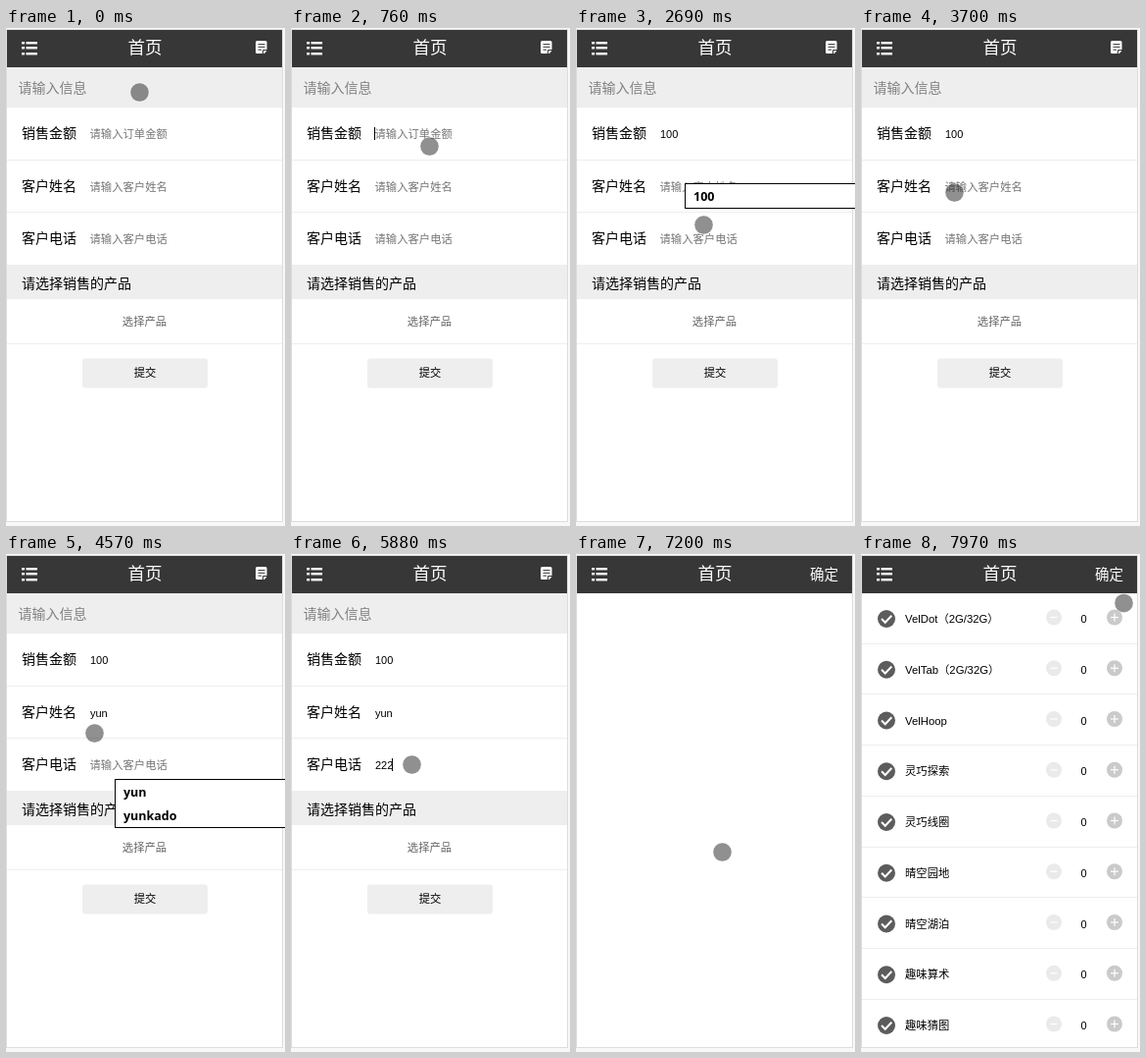
Animation of 285 by 507 pixels, one loop 8 s. Source, as an HTML page with a canvas:

```html
<!DOCTYPE html>
<html lang="zh-CN">
<head>
<meta charset="utf-8">
<title>首页</title>
<style>
html, body { margin: 0; width: 100%; height: 100%; overflow: hidden; background: #f8f8f8; }
canvas { display: block; }
</style>
</head>
<body>
<canvas id="stage" width="285" height="507"></canvas>
<script>
const ctx = document.getElementById('stage').getContext('2d');
const LOOP = 8000;
const W = 285, H = 507;
const SANS = '"Liberation Sans", "Noto Sans CJK SC", "Noto Sans CJK", sans-serif';
const CJK = '"Noto Sans CJK SC", "Noto Sans CJK", sans-serif';
const BOLD = '"Open Sans", "Noto Sans", sans-serif';

const FIELDS = [
  { y: 108, label: '销售金额', hint: '请输入订单金额' },
  { y: 162, label: '客户姓名', hint: '请输入客户姓名' },
  { y: 215, label: '客户电话', hint: '请输入客户电话' }
];
// typed text: [time, value] per field
const TYPED = [
  [[1220, '1'], [1530, '10'], [1680, '100']],
  [[3890, 'y'], [3950, 'yu'], [4020, 'yun']],
  [[5600, '2'], [5660, '22'], [5730, '222']]
];
// caret: [from, to, field]
const CARET = [
  [760, 2310, 0], [2840, 3090, 0],
  [3160, 3700, 1], [3890, 4570, 1], [5030, 5180, 1],
  [5180, 6250, 2], [6880, 7200, 2]
];
// suggestions: [from, to, top, items]
const LISTS = [
  [1220, 1610, 158, ['1', '100', '10', '12', '15', '18']],
  [1610, 1760, 158, ['100', '10']],
  [1760, 3090, 158, ['100']],
  [3890, 5180, 229, ['yun', 'yunkado']],
  [5600, 5880, 277, ['222', '2220']]
];
// pointer: [first step, last step, steps, x, y, control x, control y]
const MOVES = [
  [70, 190, 3, 169.5, 14.5],
  [260, 440, 4, 141.5, 120.5, 166, 75],
  [2310, 2310, 1, 141.5, 121.5],
  [2460, 2540, 2, 132.5, 212.5],
  [2690, 2690, 1, 130.5, 200.5],
  [2760, 2840, 2, 96.5, 168.5],
  [3090, 3090, 1, 100.5, 168.5],
  [3470, 3470, 1, 95.5, 167.5],
  [4570, 4570, 1, 90.5, 182.5],
  [4650, 5030, 6, 123.5, 209.5, 132, 202],
  [5420, 5420, 1, 123.5, 210.5],
  [5600, 5730, 3, 123.5, 214.5],
  [5960, 6330, 6, 124.5, 337.5, 89, 270],
  [6500, 6580, 2, 149.5, 303.5, 154, 306],
  [7510, 7740, 4, 221.5, 122.5],
  [7890, 7970, 2, 268.5, 50]
];
const PRODUCTS = [
  'VelDot（2G/32G）', 'VelTab（2G/32G）', 'VelHoop', '灵巧探索', '灵巧线圈',
  '晴空园地', '晴空湖泊', '趣味算术', '趣味猜图'
];

function rect(x, y, w, h, color) {
  ctx.fillStyle = color;
  ctx.fillRect(x, y, w, h);
}

function round(x, y, w, h, r, color) {
  ctx.fillStyle = color;
  ctx.beginPath();
  ctx.roundRect(x, y, w, h, r);
  ctx.fill();
}

function disc(x, y, r, color) {
  ctx.fillStyle = color;
  ctx.beginPath();
  ctx.arc(x, y, r, 0, Math.PI * 2);
  ctx.fill();
}

function line(points, color, width) {
  ctx.strokeStyle = color;
  ctx.lineWidth = width;
  ctx.beginPath();
  points.forEach(([x, y], i) => i ? ctx.lineTo(x, y) : ctx.moveTo(x, y));
  ctx.stroke();
}

// y is the middle of the glyphs
function text(str, x, y, size, color, { family = CJK, weight = 400, align = 'left' } = {}) {
  ctx.font = `${weight} ${size}px ${family}`;
  ctx.textAlign = align;
  ctx.fillStyle = color;
  ctx.fillText(str, x, Math.round(y + size * 0.37));
}

function pointerAt(t) {
  let x = 136.5, y = 65.5;
  for (const [t0, t1, n, x1, y1, cx = (x + x1) / 2, cy = (y + y1) / 2] of MOVES) {
    if (t < t0) break;
    const gap = n > 1 ? (t1 - t0) / (n - 1) : 1;
    const u = Math.min(n, Math.floor((t - t0) / gap + 0.001) + 1) / n;
    const a = (1 - u) * (1 - u), b = 2 * u * (1 - u), c = u * u;
    x = a * x + b * cx + c * x1;
    y = a * y + b * cy + c * y1;
    if (u < 1) break;
  }
  return [x, y];
}

function valueAt(field, t) {
  return TYPED[field].reduce((v, [at, s]) => t >= at ? s : v, '');
}

function drawHeader(picking) {
  rect(1, 2, 281, 38, '#373737');
  for (const y of [14, 19, 25]) {
    rect(16, y, 3, 2.4, '#fff');
    rect(20.5, y, 11.5, 2.4, '#fff');
  }
  text('首页', 142, 20, 17.5, '#fff', { align: 'center' });
  if (picking) {
    text('确定', 239, 20.5, 14.5, '#fff', { weight: 500 });
    return;
  }
  round(255, 13, 11.5, 13, 1.5, '#fff');
  rect(257.5, 16, 7, 1.1, '#444');
  rect(257.5, 18.8, 7, 1.1, '#444');
  rect(257.5, 21.6, 3.5, 1.1, '#444');
  line([[262.5, 26], [262.5, 22.5], [267, 22.5]], '#373737', 1);
  ctx.fillStyle = '#373737';
  ctx.beginPath();
  ctx.moveTo(267, 22.5);
  ctx.lineTo(267, 27);
  ctx.lineTo(263, 27);
  ctx.fill();
}

function drawForm(t) {
  rect(1, 40, 281, 41, '#eee');
  text('请输入信息', 12.5, 61, 14, '#808080');
  FIELDS.forEach(({ y, label, hint }, i) => {
    const value = valueAt(i, t);
    text(label, 16, y - 1.5, 14, '#000');
    if (value) text(value, 86, y, 11, '#000', { family: SANS });
    else text(hint, 85.5, y, 11.33, '#757575');
    if (CARET.some(([a, b, f]) => f === i && t >= a && t < b)) {
      ctx.font = `11px ${SANS}`;
      rect(Math.floor(85.6 + ctx.measureText(value).width), y - 7, 1, 13, '#000');
    }
  });
  rect(1, 134, 281, 1, '#eee');
  rect(1, 187, 281, 1, '#eee');
  rect(1, 241, 281, 35, '#eee');
  text('请选择销售的产品', 16, 260, 14, '#000');
  text('选择产品', 141.5, 299, 11.33, '#666', { align: 'center' });
  rect(1, 321, 281, 1, '#eee');
  round(78, 336.5, 128, 30, 3, '#eee');
  text('提交', 142, 351, 11.33, '#000', { align: 'center' });
}

function drawProducts() {
  PRODUCTS.forEach((name, i) => {
    const y = 66 + i * 51.75;
    disc(26, y, 9, '#5c5c5c');
    line([[21, y], [24.7, y + 3.7], [31.3, y - 3.2]], '#fff', 2);
    text(name, 45, y, 11.33, '#000', { family: SANS });
    disc(197, y - 1.5, 8, '#eaeaea');
    line([[193.5, y - 1.5], [200.5, y - 1.5]], '#fff', 1.2);
    text('0', 227.5, y, 11, '#000', { family: SANS, align: 'center' });
    disc(259, y - 1.5, 8, '#cacaca');
    line([[255, y - 1.5], [263, y - 1.5]], '#fff', 1.2);
    line([[259, y - 5.5], [259, y + 2.5]], '#fff', 1.2);
    if (i < PRODUCTS.length - 1) rect(1, Math.round(y + 24.5), 281, 1, '#eee');
  });
}

function drawList(t) {
  const open = LISTS.find(([a, b]) => t >= a && t < b);
  if (!open) return;
  const [, , top, items] = open;
  const h = items.length * 24 + 2;
  const left = W - 174;
  rect(left, top, 180, h, '#000');
  rect(left + 1, top + 1, 180, h - 2, '#fff');
  items.forEach((s, i) =>
    text(s, left + 9, top + 13.5 + i * 24, 12.5, '#000', { family: BOLD, weight: 700 }));
}

function drawPointer(t) {
  const [x, y] = pointerAt(t);
  disc(x, y, 9.5, 'rgba(34,34,34,0.5)');
  ctx.strokeStyle = 'rgba(255,255,255,0.45)';
  ctx.lineWidth = 1;
  ctx.beginPath();
  ctx.arc(x, y, 9.7, 0, Math.PI * 2);
  ctx.stroke();
}

function draw(t) {
  rect(0, 0, W, H, '#f8f8f8');
  rect(0, 1, 283, 502, '#ddd');
  rect(1, 2, 281, 500, '#fff');
  drawHeader(t >= 7200);
  if (t < 7200) drawForm(t);
  else if (t >= 7510) drawProducts();
  drawList(t);
  drawPointer(t);
}

const start = performance.now();
function tick() {
  draw((performance.now() - start) % LOOP);
  requestAnimationFrame(tick);
}
tick();
</script>
</body>
</html>
```
